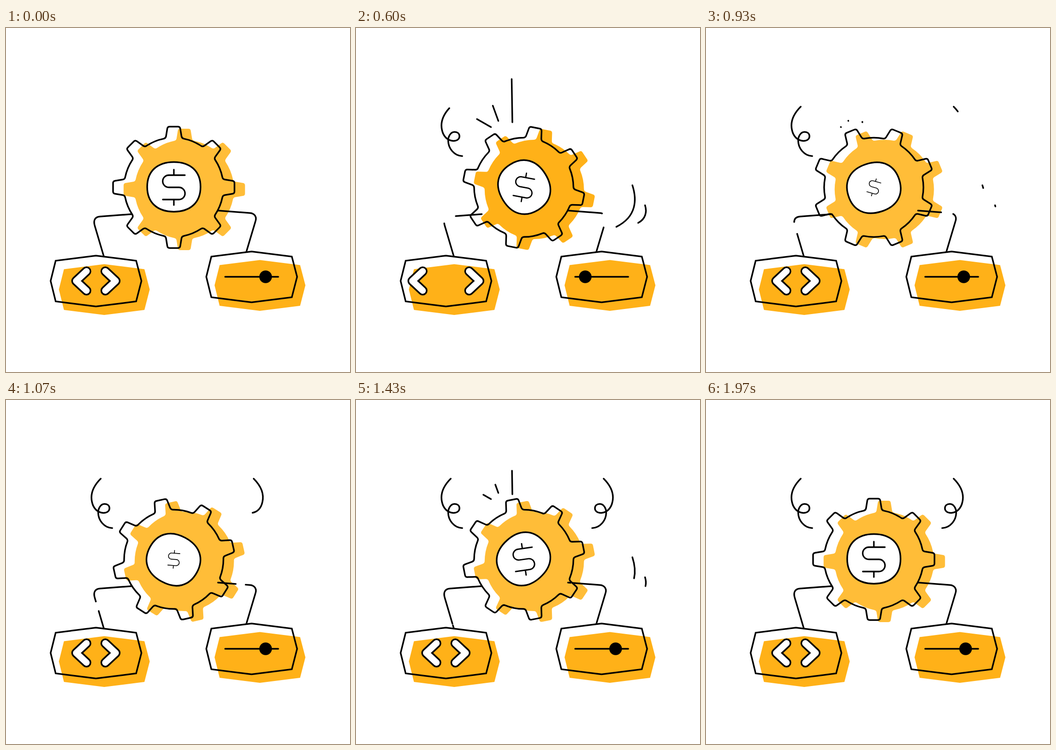
These frames come from a looping animation (748 by 748 pixels, 2 s). An HTML page:

```html
<!DOCTYPE html>
<html lang="en">
<head>
<meta charset="utf-8">
<title>Gear workflow</title>
<style>
  html, body { margin: 0; width: 100%; height: 100%; overflow: hidden; background: #fff; }
  svg { display: block; width: 100vw; height: 100vh; }
  .line { fill: none; stroke: #000; stroke-width: 3.5; stroke-linecap: round; stroke-linejoin: round; }
  .sharp { stroke-linejoin: miter; }
  .fill { fill: #ffb118; }
  .thick { stroke-width: 21; }
  .core { stroke: #fff; stroke-width: 14; }
</style>
</head>
<body>
<svg viewBox="0 0 748 748">
  <defs>
    <path id="box" d="M195.5 495 283 506 294.5 550 283 594.5 195.5 605.5 108 594.5 97 550 108 506Z"/>
    <path id="gear"/>
    <path id="left" d="M175 529 152.5 550 175 571"/>
    <path id="right" d="M216 529 238.5 550 216 571"/>
  </defs>

  <g id="gearFill"><use href="#gear"/></g>
  <g id="gearLine"><use href="#gear" class="line"/></g>
  <path id="blob" class="line" style="fill:#fff"
    d="M58 0C58 34 36 54 0 54S-58 34-58 0-36-54 0-54 58-34 58 0Z"/>
  <path id="dollar" class="line" style="stroke-width:3.3"
    d="M24-26.5H-11A13.25 13.25 0 0 0-11 0H11A13.25 13.25 0 0 1 11 26.5H-24M0-38.5V-26.5M0 26.5V38.5"/>

  <path class="line wire" d="M212.5 496 193 430C190 420 192 411 204 410L273.5 404.7"/>
  <path class="line wire" d="M461 397 530 402.3C541 403 545.5 411 542.5 420L522.5 487"/>

  <use href="#box" class="fill" x="18" y="18.5"/>
  <use href="#box" class="line sharp"/>
  <use href="#box" class="fill" x="356.5" y="9.5"/>
  <use href="#box" class="line sharp" x="338.5" y="-9"/>

  <g id="open"><use href="#left" class="line thick"/><use href="#left" class="line core"/></g>
  <g id="close"><use href="#right" class="line thick"/><use href="#right" class="line core"/></g>

  <path class="line" d="M476.5 541H592"/>
  <circle id="knob" cx="564.5" cy="541" r="13.7"/>

  <g class="line">
    <path class="ray" pathLength="100" d="M340 205 338.5 111"/>
    <path class="ray" pathLength="100" d="M309.5 202 297.5 169"/>
    <path class="ray" pathLength="100" d="M293.5 215.5 263 198"/>
    <path class="arc" pathLength="100" d="M601 342C611 373 611 412 562.5 434"/>
    <path class="arc" pathLength="100" d="M628.5 385.5C633 400 630 416 612 424.5"/>
    <path id="curlA" pathLength="100"/>
    <path id="curlB" pathLength="100" transform="translate(744.5) scale(-1 1)"/>
  </g>
</svg>
<script>
const $ = id => document.getElementById(id);
const all = sel => [...document.querySelectorAll(sel)];
const LOOP = 2000, FPS = 30;

const smooth = p => p * p * (3 - 2 * p);
const linear = p => p;

// Value at frame f of a list of [frame, value] keys.
function track(f, keys, ease = smooth) {
  if (f <= keys[0][0]) return keys[0][1];
  for (let i = 1; i < keys.length; i++) {
    const [a, va] = keys[i - 1], [b, vb] = keys[i];
    if (f <= b) return va + (vb - va) * ease((f - a) / (b - a));
  }
  return keys[keys.length - 1][1];
}

function gearPath() {
  let d = '';
  for (let k = 0; k < 8; k++) {
    const a = k * Math.PI / 4, c = Math.cos(a), s = Math.sin(a);
    const p = (x, y) => `${(x * c - y * s).toFixed(2)} ${(x * s + y * c).toFixed(2)} `;
    d += (k ? 'A108 108 0 0 1 ' : 'M') + p(-21.5, -105.8)
      + 'Q' + p(-17.5, -106.8) + p(-16.8, -111)
      + 'L' + p(-14.1, -127.6) + 'Q' + p(-13.4, -132) + p(-9, -132)
      + 'L' + p(9, -132) + 'Q' + p(13.4, -132) + p(14.1, -127.6)
      + 'L' + p(16.8, -111) + 'Q' + p(17.5, -106.8) + p(21.5, -105.8);
  }
  return d + 'A108 108 0 0 1 -21.5 -105.8Z';
}

$('gear').setAttribute('d', gearPath());
const curl = 'M206 171C190 187 183 205 187 222C190 236 199 244.5 211 245.5'
  + 'C220 246 225 241 225 235.5C225 229 220 226 214.5 226'
  + 'C205 226 200 237 200.5 246C201 262 214 278 231 278.5';
$('curlA').setAttribute('d', curl);
$('curlB').setAttribute('d', curl);

const rays = all('.ray'), arcs = all('.arc'), wires = all('.wire');

function trim(el, p, fromEnd) {
  el.style.visibility = p > 0 ? 'visible' : 'hidden';
  el.style.strokeDasharray = p < 1 ? `${p * 100} 300` : 'none';
  el.style.strokeDashoffset = fromEnd && p < 1 ? (p - 1) * 100 : 0;
}

// Four notches of an eighth of a half-turn tooth pitch, each with a small overshoot.
const notch = (f, start) => track(f, [[start, 0], [start + 5, 12.6], [start + 9, 11.25]]);
const gearAngle = f => [5.5, 19, 28.5, 50].reduce((sum, s) => sum + notch(f, s), 0);

const pulse = (f, a, b, c, d) => track(f, [[a, 0], [b, 1], [c, 1], [d, 0]]);
const twice = (f, ...k) => Math.max(pulse(f, ...k), pulse(f - 29, ...k));

function draw(f) {
  const turn = gearAngle(f);
  $('gearFill').setAttribute('transform', `translate(387.7 351) rotate(${turn})`);
  $('gearLine').setAttribute('transform', `translate(364.8 346.4) rotate(${turn})`);
  const deep = (f >= 14 && f < 23) || (f >= 33 && f < 43);
  $('gearFill').setAttribute('fill', deep ? '#ffb118' : '#ffbd38');

  const spin = track(f, [[6, 0], [53, 360]]);
  $('blob').setAttribute('transform', `translate(364.8 346.4) rotate(${spin}) translate(.2 -1)`);

  const size = track(f, [[12, 1], [26.6, .5], [31, .5], [48, 1]]);
  const tilt = track(f, [[12, 0], [24, 21], [40, -12], [48, 0]]);
  $('dollar').setAttribute('transform', `translate(365 346.5) rotate(${tilt}) scale(${size})`);

  const spread = track(f, [[5.5, 0], [14, 36], [18, 30], [23, 0]]);
  $('open').setAttribute('transform', `translate(${-spread})`);
  $('close').setAttribute('transform', `translate(${spread})`);

  const slide = pulse(f, 10.3, 19, 20, 29.4);
  $('knob').setAttribute('cx', 564.5 - 68.5 * slide);

  const near = track(f, [[6, 0], [11, 15], [18, 74], [20, 79], [28, 50.5], [37, 24], [45, 0]], linear);
  const far = track(f, [[6, 0], [11, 41], [18, 109], [20, 113], [28, 77], [37, 39.5], [45, 0]], linear);
  for (const w of wires)
    w.style.strokeDasharray = far > near ? `${near} ${far - near} 400 0` : 'none';

  const ray = twice(f, 9.5, 18, 20, 28.5);
  const arc = twice(f, 10, 19, 20.3, 29.3);
  rays.forEach(el => trim(el, ray));
  arcs.forEach(el => trim(el, arc));
  trim($('curlA'), track(f, [[5.5, 0], [19.2, 1]]), true);
  trim($('curlB'), track(f, [[25.9, 0], [39.1, 1]]));
}

const begin = performance.now();
function tick() {
  const t = (performance.now() - begin) % LOOP;
  draw(Math.floor((t + 5) * FPS / 1000) % 60);
  requestAnimationFrame(tick);
}
tick();
</script>
</body>
</html>
```
